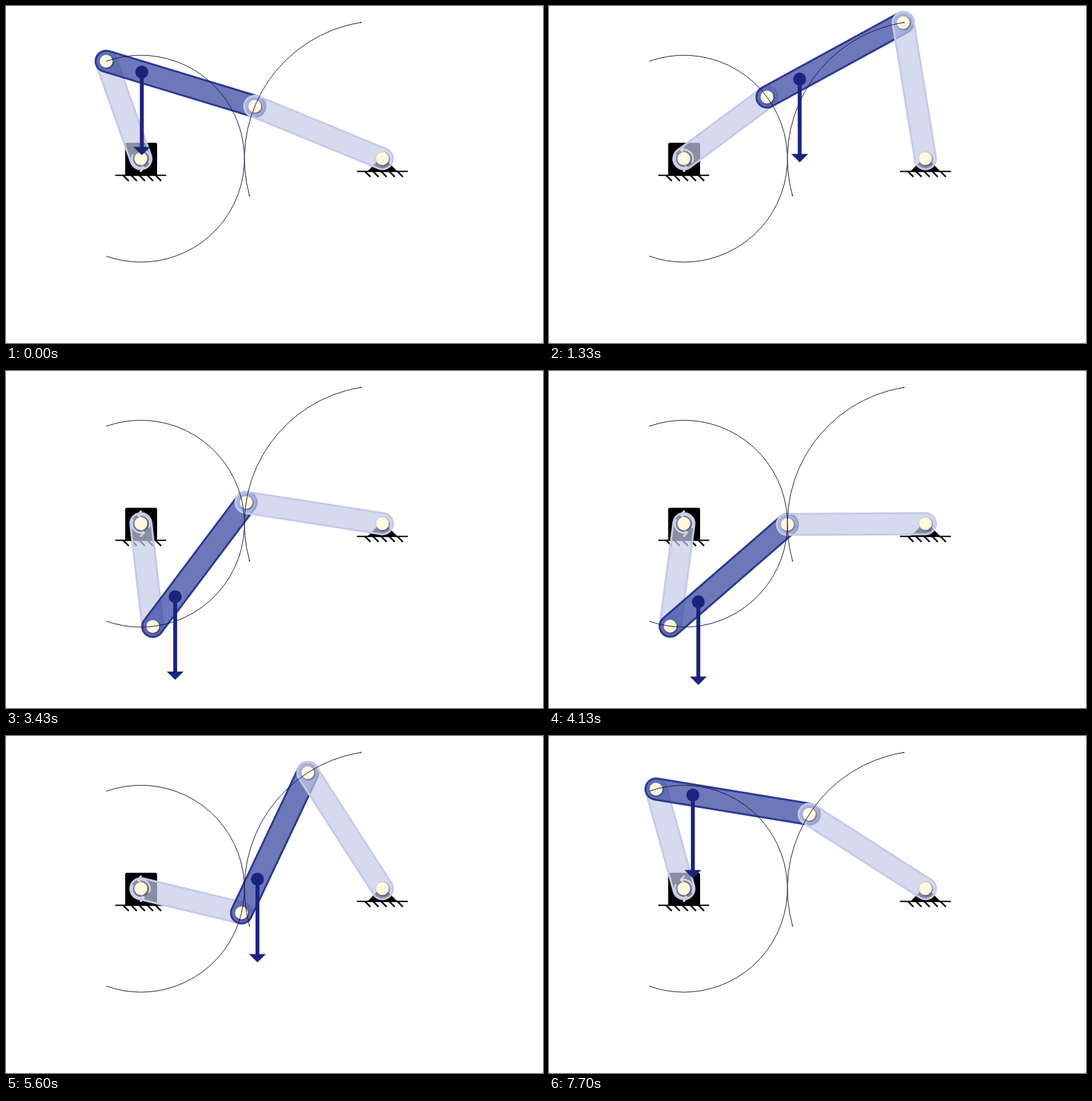
An HTML page with a canvas for the animation above (7.77 s loop, 828 by 520 pixels).

```html
<!DOCTYPE html>
<html lang="en">
<head>
<meta charset="utf-8">
<title>Four-bar linkage</title>
<style>
html, body { margin: 0; width: 828px; height: 520px; overflow: hidden; background: #fff; }
canvas { display: block; }
</style>
</head>
<body>
<canvas id="stage" width="828" height="520"></canvas>
<script>
const ctx = document.getElementById('stage').getContext('2d');
const LOOP = 7770, STEP = 70, RAD = Math.PI / 180;

// Link lengths are in the ratio 3 : 4.5 : 4, with the pivots 7 apart.
const UNIT = 53.2;
const CRANK = 3 * UNIT, COUPLER = 4.5 * UNIT, ROCKER = 4 * UNIT;
const O1 = { x: 208, y: 235.6 }, O2 = { x: O1.x + 7 * UNIT, y: 235.6 };

const LIGHT = { fill: 'rgba(197,202,233,.7)', stroke: '#c5cae9' };
const DARK = { fill: 'rgba(48,63,159,.7)', stroke: '#2c3990' };
const NAVY = '#1a237e';

// Crank angle in degrees over time: down to the limit, a short stop, back up.
const KEYS = [
  [0, 109.6], [70, 108.5], [1330, 36.6], [3850, -107.4], [3920, -107.4],
  [3990, -105.6], [4830, -57.6], [6440, 34.5], [7700, 105.6], [7770, 109.6]
];

function crankAngle(t) {
  const i = KEYS.findIndex(k => k[0] > t);
  const [t0, a0] = KEYS[i - 1], [t1, a1] = KEYS[i];
  return (a0 + (a1 - a0) * (t - t0) / (t1 - t0)) * RAD;
}

function solve(angle) {
  const a = { x: O1.x + CRANK * Math.cos(angle), y: O1.y - CRANK * Math.sin(angle) };
  const dx = O2.x - a.x, dy = O2.y - a.y, d = Math.hypot(dx, dy);
  const cos = (ROCKER ** 2 + d * d - COUPLER ** 2) / (2 * ROCKER * d);
  const turn = Math.atan2(dy, dx) + Math.acos(Math.min(1, cos));
  const b = { x: O2.x - ROCKER * Math.cos(turn), y: O2.y - ROCKER * Math.sin(turn) };
  return { a, b };
}

function line(points, width, color) {
  ctx.beginPath();
  points.forEach(([x, y]) => ctx.lineTo(x, y));
  ctx.lineWidth = width;
  ctx.strokeStyle = color;
  ctx.stroke();
}

function polygon(points, color) {
  ctx.beginPath();
  points.forEach(([x, y]) => ctx.lineTo(x, y));
  ctx.fillStyle = color;
  ctx.fill();
}

function dot(x, y, r, color) {
  ctx.beginPath();
  ctx.arc(x, y, r, 0, 2 * Math.PI);
  ctx.fillStyle = color;
  ctx.fill();
}

function arc(c, r, from, to, width, color) {
  ctx.beginPath();
  ctx.arc(c.x, c.y, r, from * RAD, to * RAD);
  ctx.lineWidth = width;
  ctx.strokeStyle = color;
  ctx.stroke();
}

function ground(x, y) {
  line([[x - 39.3, y], [x + 39.3, y]], 2, '#000');
  for (let i = 0; i < 5; i++) {
    const hx = x - 27 + i * 12.5;
    line([[hx, y], [hx + 8.5, y + 8.5]], 2.4, '#000');
  }
}

function motor() {
  ctx.beginPath();
  ctx.roundRect(183.7, 211, 49.3, 51, 3);
  ctx.fillStyle = '#000';
  ctx.fill();
  ground(207.7, 261.3);
  // Two curved arrows around the shaft, half a turn apart.
  for (const turn of [0, Math.PI]) {
    ctx.save();
    ctx.translate(O1.x, O1.y);
    ctx.rotate(turn);
    arc({ x: 0, y: 0 }, 14, -105, 28, 2.5, '#fff');
    line([[1, -20], [-5, -13.7], [1, -8]], 2.5, '#fff');
    ctx.restore();
  }
}

function support() {
  polygon([[O2.x, 232], [O2.x - 23, 255], [O2.x + 23, 255]], '#000');
  ground(O2.x, 255.2);
}

function link(p, q, style) {
  const r = 16.3, length = Math.hypot(q.x - p.x, q.y - p.y);
  ctx.save();
  ctx.translate(p.x, p.y);
  ctx.rotate(Math.atan2(q.y - p.y, q.x - p.x));
  ctx.beginPath();
  ctx.roundRect(-r, -r, length + 2 * r, 2 * r, r);
  ctx.fillStyle = style.fill;
  ctx.fill();
  ctx.lineWidth = 3;
  ctx.strokeStyle = style.stroke;
  ctx.stroke();
  ctx.restore();
}

function pin(p) {
  ctx.save();
  ctx.shadowColor = 'rgba(0,0,0,.6)';
  ctx.shadowBlur = 3;
  ctx.shadowOffsetX = ctx.shadowOffsetY = 1;
  dot(p.x, p.y, 10, '#fff8e1');
  ctx.restore();
}

function traces() {
  const color = '#15163f';
  arc(O1, CRANK, -109.6, 109.6, 1, color);
  arc(O2, ROCKER, 164.4, 261, 1, color);
  for (const deg of [164.4, 261]) {
    dot(O2.x + ROCKER * Math.cos(deg * RAD), O2.y + ROCKER * Math.sin(deg * RAD), 1, color);
  }
}

function weight(a, b) {
  const x = a.x + (b.x - a.x) * 0.24, y = a.y + (b.y - a.y) * 0.24;
  line([[x, y], [x, y + 117]], 6, NAVY);
  polygon([[x - 13, y + 115.5], [x + 13, y + 115.5], [x, y + 128.3]], NAVY);
  dot(x, y, 10, NAVY);
}

function draw(t) {
  const { a, b } = solve(crankAngle(t));
  ctx.fillStyle = '#777';
  ctx.fillRect(0, 0, 828, 520);
  ctx.beginPath();
  ctx.roundRect(0, 0, 828, 520, 2);
  ctx.fillStyle = '#fff';
  ctx.fill();
  motor();
  support();
  link(O1, a, LIGHT);
  link(a, b, DARK);
  link(b, O2, LIGHT);
  [O1, a, b, O2].forEach(pin);
  traces();
  weight(a, b);
}

const start = performance.now();
function tick() {
  const t = (performance.now() - start) % LOOP;
  draw(Math.floor(t / STEP) * STEP);
  requestAnimationFrame(tick);
}
tick();
</script>
</body>
</html>
```
